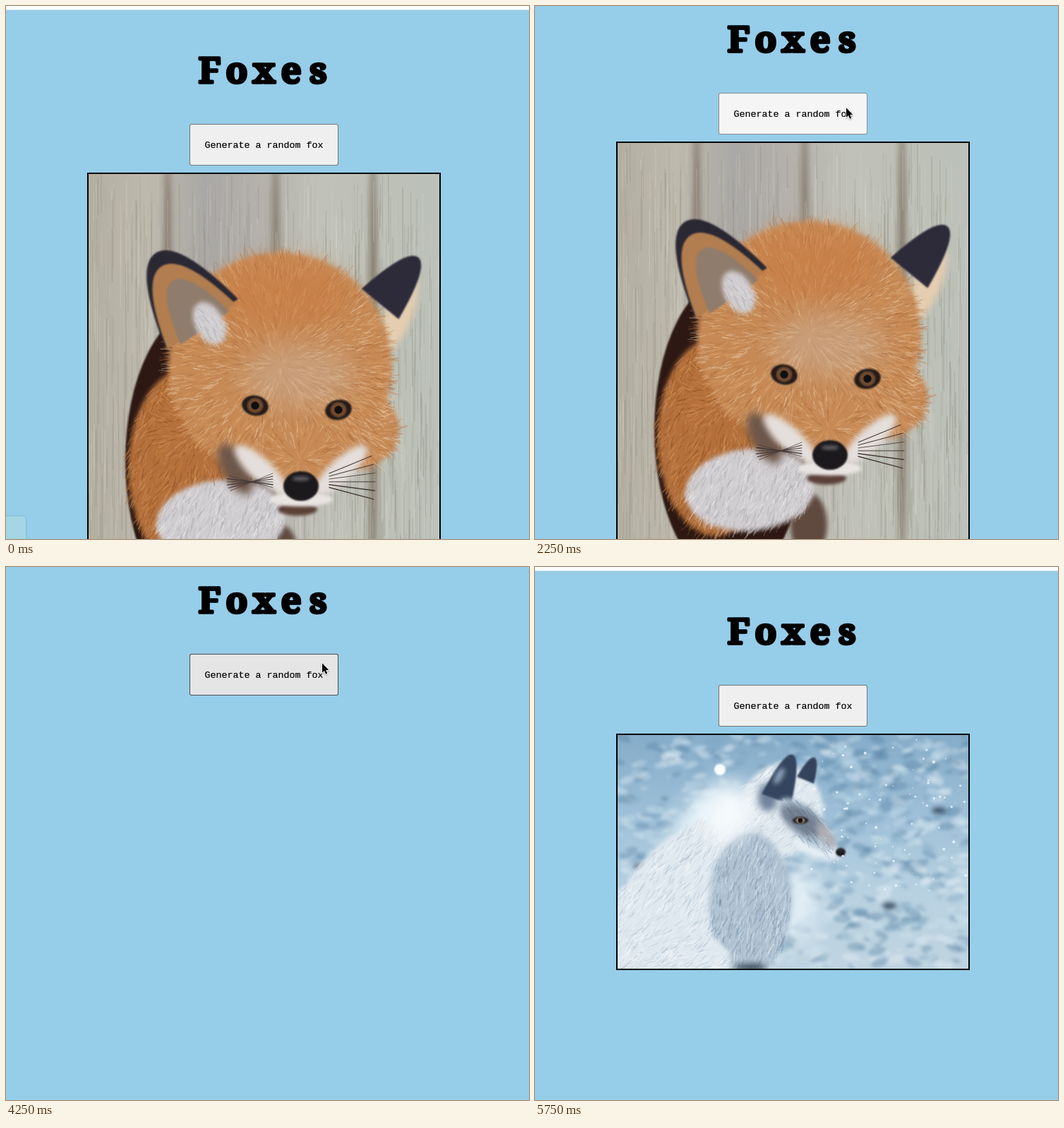
An HTML page with a canvas for the animation above (6500 ms loop, 741x755 px).

```html
<!DOCTYPE html>
<html lang="en">
<head>
<meta charset="utf-8">
<title>Foxes</title>
<style>
  html, body { margin: 0; width: 100%; height: 100%; overflow: hidden; background: #96cde9; }
  canvas { display: block; }
</style>
</head>
<body>
<canvas id="stage" width="741" height="755"></canvas>
<script>
const LOOP = 6500, SCROLL = 44;
const ctx = document.getElementById('stage').getContext('2d');

function seeded(seed) {
  return () => {
    seed = (seed * 1664525 + 1013904223) % 4294967296;
    return seed / 4294967296;
  };
}

function photo(height, seed, paint) {
  const canvas = document.createElement('canvas');
  canvas.width = 741;
  canvas.height = 755;
  const g = canvas.getContext('2d'), rnd = seeded(seed);
  const any = list => list[Math.floor(rnd() * list.length)];
  const across = () => 117 + rnd() * 497, down = () => 194 + rnd() * (height - 4);
  g.beginPath();
  g.rect(117, 194, 497, height - 4);
  g.clip();
  g.lineCap = 'round';

  const wash = (dx, dy, colors) => {
    const grad = g.createLinearGradient(117, 194, 117 + dx, 194 + dy);
    colors.forEach((color, i) => grad.addColorStop(i / (colors.length - 1), color));
    g.fillStyle = grad;
    g.fillRect(117, 194, 497, height);
  };

  const oval = (color, blur, x, y, rx, ry, turn = 0) => {
    g.filter = blur ? `blur(${blur}px)` : 'none';
    g.fillStyle = color;
    g.beginPath();
    g.ellipse(x, y, rx, ry, turn, 0, 7);
    g.fill();
    g.filter = 'none';
  };

  const hair = (color, x, y, angle, length) => {
    g.strokeStyle = color;
    g.lineWidth = 0.7 + rnd();
    g.beginPath();
    g.moveTo(x, y);
    g.lineTo(x + Math.cos(angle) * length, y + Math.sin(angle) * length);
    g.stroke();
  };

  // Oval patch of fur; without a flow angle the hairs point outward
  const coat = (colors, x, y, rx, ry, turn = 0, flow = null) => {
    oval(colors[0], 3, x, y, rx, ry, turn);
    g.globalAlpha = 0.4;
    for (let i = 0; i < rx * ry * 0.16; i++) {
      const a = rnd() * 7, r = Math.sqrt(rnd()), u = Math.cos(a) * r * rx, v = Math.sin(a) * r * ry;
      const dx = u * Math.cos(turn) - v * Math.sin(turn), dy = u * Math.sin(turn) + v * Math.cos(turn);
      const angle = (flow ?? Math.atan2(dy, dx)) + (rnd() - 0.5) * 0.7;
      hair(any(colors), x + dx, y + dy, angle, 5 + rnd() * 12);
    }
    g.globalAlpha = 1;
  };

  // Leaf from a base centre to a tip
  const ear = (color, x, y, tipX, tipY, half) => {
    const dx = tipX - x, dy = tipY - y, k = half / Math.hypot(dx, dy);
    const nx = -dy * k, ny = dx * k;
    g.filter = 'blur(1px)';
    g.fillStyle = color;
    g.beginPath();
    g.moveTo(x + nx, y + ny);
    g.quadraticCurveTo(tipX + nx * 0.6, tipY + ny * 0.6, tipX, tipY);
    g.quadraticCurveTo(tipX - nx * 0.6, tipY - ny * 0.6, x - nx, y - ny);
    g.fill();
    g.filter = 'none';
  };

  const eye = (iris, x, y, size, squint, turn = 0) => {
    oval('#241a18', 1, x, y, size, size * squint, turn);
    oval(iris, 1, x, y, size * 0.6, size * squint * 0.75);
    oval('#120e0f', 0.5, x, y, size * 0.3, size * 0.3);
  };

  const nose = (x, y, rx, ry) => {
    oval('#1b191c', 1, x, y, rx, ry);
    oval('#5b585e', 2, x, y - ry / 2, rx / 2, ry / 6);
  };

  const whiskers = (color, x, y, reach) => {
    for (let i = 0; i < 6; i++) hair(color, x, y + i * 4, (i - 3) * 0.13, reach);
  };

  paint({ g, rnd, any, across, down, wash, oval, hair, coat, ear, eye, nose, whiskers });
  return { canvas, height };
}

const fenceFox = photo(700, 7, p => {
  const { g, rnd, any, across, down, oval, coat, ear } = p;
  const orange = ['#c78a56', '#e2b07c', '#a9693a', '#d59a60', '#ecd4b8', '#b47a4c'];
  const rust = ['#b4703c', '#d89f66', '#84491f', '#c68144'];
  const white = ['#cfcccf', '#f0eef0', '#a5a2a8', '#dfdcdc'];

  p.wash(497, 0, ['#b2aea1', '#bdb9ac', '#aaa8a6', '#b5b2ab', '#c0c1b8', '#bdc0b6', '#bcc1b9']);
  [229, 382, 520].forEach(x => oval('#82786b', 4, x, 480, 6, 330));
  g.globalAlpha = 0.25;
  for (let i = 0; i < 1400; i++) {
    p.hair(any(['#7f7b70', '#dedcd2', '#9f9b8d']), across(), down(), Math.PI / 2, 40 + rnd() * 80);
  }
  g.globalAlpha = 1;

  oval('#2d1813', 1, 277, 600, 108, 215);
  coat(rust, 256, 610, 82, 140, 0, 2.1);
  oval('#604a40', 3, 388, 735, 26, 45);
  coat(white, 305, 685, 92, 58, -0.1, 2);

  oval('#e4cdb0', 4, 557, 390, 19, 58, 0.35);
  coat(rust, 275, 555, 62, 68);
  coat(orange, 490, 555, 66, 58);
  coat(orange, 388, 465, 158, 160);
  oval('rgba(200,123,64,.6)', 18, 390, 365, 95, 45);
  oval('rgba(204,176,150,.55)', 18, 415, 480, 80, 45);
  ear('#2a2833', 277, 405, 212, 306, 62);
  ear('#b27e50', 277, 410, 220, 325, 58);
  ear('#8f7c6c', 282, 412, 236, 345, 42);
  coat(white, 288, 405, 20, 32, -0.5, 0.9);
  ear('#2d2b3a', 530, 378, 584, 312, 34);

  oval('#6d564a', 6, 325, 612, 18, 40, -0.5);
  coat(orange, 418, 598, 50, 50);
  [-1, 1].forEach(side => {
    oval('#e4dfdc', 4, 418 + side * 56, 614, 50, 16, side * -0.75);
    p.eye('#6d4a30', 412 + side * 59, 525 + side * 3, 19, 0.75, side * -0.2);
    p.whiskers('#463b38', 418 + side * 40, 618, side * 65);
  });
  oval('#5b4038', 2, 413, 669, 28, 9);
  oval('#e8e4e2', 2, 418, 655, 45, 10);
  p.nose(418, 636, 25, 21);
});

const motherFox = photo(700, 19, p => {
  const { g, rnd, any, across, down, oval, coat, ear } = p;
  const gold = ['#c78f52', '#e6bb80', '#a06532', '#d59c58', '#f0dbb6', '#b37a42'];
  const brown = ['#a66c42', '#d5a474', '#6d4023', '#b87a4c'];
  const sand = ['#ab8b66', '#cdb08a', '#79623f', '#bb9a70'];
  const cream = ['#d0bfae', '#f3ece2', '#927d70', '#e0d2c2'];

  p.wash(497, 110, ['#252a19', '#3c4924', '#74863f', '#95a45c', '#a0ad6a', '#8b9a4e', '#95a257']);
  for (let i = 0; i < 40; i++) {
    oval(any(['#b5c083', '#64783a', '#7d8f48']), 9, 260 + rnd() * 354, 194 + rnd() * 130, 8, 22, rnd() * 3);
  }
  oval('#171813', 16, 145, 455, 85, 215);
  for (let i = 0; i < 10; i++) {
    oval(any(['#3b4a2f', '#33352a', '#47603a']), 7, 117 + rnd() * 90, 300 + rnd() * 280, 28, 9, rnd() - 0.5);
  }
  oval('#6b5a35', 10, 598, 400, 22, 65);

  coat(brown, 600, 625, 88, 205, 0, 1.9);
  coat(cream, 580, 458, 58, 18, 0.65, 2);

  ear('#c48d56', 262, 312, 226, 194, 48);
  ear('#5a4e4c', 272, 288, 233, 200, 32);
  ear('#35241e', 502, 347, 594, 222, 70);
  ear('#c07e42', 502, 350, 588, 229, 67);
  ear('#844a27', 510, 350, 560, 270, 36);
  coat(gold, 258, 503, 50, 48);
  coat(gold, 492, 510, 60, 60);
  coat(gold, 375, 435, 168, 148);
  oval('#f5e8d2', 9, 370, 298, 46, 12);
  oval('#ead0a6', 9, 213, 415, 9, 65);
  oval('rgba(166,133,108,.65)', 10, 322, 488, 30, 35);

  coat(cream, 415, 535, 112, 30, -0.1, 0.2);
  coat(cream, 320, 566, 44, 25);
  oval('#614f48', 6, 357, 522, 20, 20);
  [[270, 438], [405, 449]].forEach(([x, y]) => {
    oval('#70452e', 7, x, y + 10, 34, 18);
    p.eye('#8d5339', x, y, 20, 0.5, 0.1);
  });
  oval('#3f2a24', 4, 445, 456, 18, 7, 0.5);
  p.whiskers('#4f392f', 365, 530, 120);
  oval('#654339', 3, 318, 577, 34, 7);
  p.nose(310, 533, 27, 23);

  coat(['#4b3d2c', '#241d13', '#836d4c'], 215, 644, 110, 18, 0, -2.2);
  coat(sand, 205, 745, 210, 106, 0, 2.8);
  coat(sand, 405, 735, 75, 75, 0, 2);
  coat(gold, 425, 635, 120, 68, 0.1);
  coat(sand, 308, 618, 24, 27);
  oval('#5e5048', 4, 314, 622, 10, 14);
  oval('#806d63', 4, 512, 645, 38, 28);
  oval('#47362f', 4, 512, 680, 32, 24, -0.4);
  oval('#a58d7e', 4, 515, 662, 26, 8, -0.2);
  oval('#3a2822', 1, 459, 601, 17, 3, 0.1);
  oval('#30262a', 1, 529, 623, 15, 11, 0.3);
});

const snowFox = photo(335, 31, p => {
  const { g, rnd, any, across, down, oval, coat, ear } = p;
  const white = ['#dfe8ef', '#ffffff', '#a9bccb', '#edf4f9', '#c4d3df'];
  const steel = ['#b0c2d1', '#6a88a2', '#e3edf5', '#8ba1b6', '#d0dde7'];

  p.wash(0, 331, ['#85acc9', '#9dbfd7', '#b8d1e1', '#bfd4e1']);
  g.globalAlpha = 0.35;
  for (let i = 0; i < 900; i++) {
    const size = 2 + rnd() * 7;
    oval(any(['#4f7a9e', '#cfe4ef', '#7aa2bf', '#eaf4f9']), 2, across(), down(), size * 1.6, size * 0.7, rnd() - 0.5);
  }
  g.globalAlpha = 1;
  [[150, 381], [502, 436], [572, 301]].forEach(([x, y]) => oval('#42586d', 3, x, y, 10, 5));
  oval('#eaf5fb', 16, 235, 320, 30, 65, 0.6);
  oval('#eaf4fa', 16, 375, 430, 20, 60);

  coat(white, 225, 430, 155, 92, -0.8, 2.2);
  coat(white, 170, 500, 70, 55, 0, 2.4);
  coat(white, 350, 300, 58, 65, 0, 2.4);
  coat(steel, 305, 430, 58, 98, 0, 1.9);
  coat(white, 215, 512, 62, 36, 0, 2.6);
  oval('#f6fafc', 14, 275, 305, 30, 45, 0.5);
  oval('#e6eff5', 4, 400, 354, 34, 15, 0.3);
  oval('#394756', 4, 305, 523, 24, 5);

  oval('#71839a', 5, 330, 282, 14, 20);
  ear('#35455f', 342, 285, 365, 222, 22);
  ear('#34435b', 383, 258, 396, 226, 13);
  oval('#8ba0b6', 3, 346, 252, 5, 13, 0.5);
  coat(steel, 385, 320, 50, 20, 0.75, 0.9);
  oval('rgba(74,84,104,.6)', 5, 378, 315, 34, 17, 0.6);
  oval('#b3adb1', 4, 412, 336, 20, 7, 0.9);
  p.eye('#9a8e86', 376, 315, 11, 0.45);
  p.nose(433, 360, 7, 6);

  oval('#f8fdff', 1, 262, 243, 8, 8);
  for (let i = 0; i < 75; i++) {
    const r = 0.6 + rnd() * 1.6;
    oval('rgba(239,249,255,.8)', 0.4, 390 + rnd() * 224, 196 + rnd() * 220, r, r);
  }
});

const emptyPhoto = { height: 4 };

// Each row holds from its time until the next one
const photos = [[0, fenceFox], [2500, null], [2750, emptyPhoto], [3250, motherFox],
  [4250, null], [4500, emptyPhoto], [4750, snowFox]];
const cursors = [[0, null], [1250, [654, 88]], [1500, [636, 95]], [1750, [508, 118]],
  [2000, [482, 128]], [2250, [440, 143]], [3750, [447, 135]], [4500, [447, 131]], [5250, null]];
const buttons = [[0, 'idle'], [1250, 'focus'], [1500, 'idle'], [2250, 'active'],
  [2500, 'hover'], [5250, 'idle']];
const looks = {
  idle: ['#efefef', '#767676'],
  focus: ['#efefef', '#1d60c4'],
  active: ['#f5f5f5', '#8d8d8d'],
  hover: ['#e5e5e5', '#4f4f4f']
};

const pick = (rows, t) => rows.filter(row => row[0] <= t).pop()[1];

function roundRect(x, y, w, h, r, color) {
  ctx.fillStyle = color;
  ctx.beginPath();
  ctx.roundRect(x, y, w, h, r);
  ctx.fill();
}

function heavyText(text, x, y, weight) {
  ctx.fillStyle = ctx.strokeStyle = '#000';
  ctx.lineWidth = weight;
  ctx.lineJoin = 'round';
  ctx.fillText(text, x, y);
  ctx.strokeText(text, x, y);
}

function drawHeading() {
  ctx.font = 'bold 51px "Noto Serif", serif';
  ctx.textAlign = 'center';
  [...'Foxes'].forEach((letter, i) => heavyText(letter, 365.5 + (i - 2) * 38.5, 64.5, 3.6));
}

function drawButton(state) {
  const [fill, edge] = looks[state], width = state === 'focus' ? 2 : 1;
  if (state === 'focus') roundRect(259, 122, 213, 61, 4, '#fff');
  roundRect(260, 123, 211, 59, 3, edge);
  roundRect(260 + width, 123 + width, 211 - 2 * width, 59 - 2 * width, 2, fill);
  ctx.font = '13.333px "Liberation Mono", "Courier New", monospace';
  ctx.textAlign = 'left';
  heavyText('Generate a random fox', 281.5, 157, 0.2);
}

function drawPhoto({ canvas, height }) {
  ctx.fillStyle = '#000';
  ctx.fillRect(115, 192, 501, height);
  if (canvas) ctx.drawImage(canvas, 0, 0);
}

function drawCursor([x, y]) {
  const arrow = new Path2D('M0 0V13.5L3 10.8L5.1 15.6L7.3 14.6L5.3 9.9H9.4Z');
  ctx.save();
  ctx.translate(x + 1, y + 1.2);
  ctx.shadowColor = 'rgba(0,0,0,.3)';
  ctx.shadowBlur = 2;
  ctx.shadowOffsetY = 1;
  ctx.strokeStyle = '#fff';
  ctx.lineWidth = 1.8;
  ctx.stroke(arrow);
  ctx.shadowColor = 'transparent';
  ctx.fillStyle = '#000';
  ctx.fill(arrow);
  ctx.restore();
}

function drawTooltip() {
  ctx.save();
  ctx.shadowColor = 'rgba(40,90,120,.3)';
  ctx.shadowBlur = 3;
  roundRect(-6, 723, 34, 40, 4, '#a4d6e3');
  ctx.restore();
}

function draw(t) {
  const image = pick(photos, t), cursor = pick(cursors, t);
  ctx.fillStyle = '#96cde9';
  ctx.fillRect(0, 0, 741, 755);
  ctx.save();
  if (t < 1250 || t >= 5750) {
    ctx.fillStyle = '#fcfdfd';
    ctx.fillRect(0, 0, 741, 5.5);
    ctx.translate(0, SCROLL);
  }
  drawHeading();
  drawButton(pick(buttons, t));
  if (image) drawPhoto(image);
  ctx.restore();
  if (cursor) drawCursor(cursor);
  if (t < 250) drawTooltip();
}

const start = performance.now();
function tick() {
  draw((performance.now() - start) % LOOP);
  requestAnimationFrame(tick);
}
draw(0);
requestAnimationFrame(tick);
</script>
</body>
</html>
```
